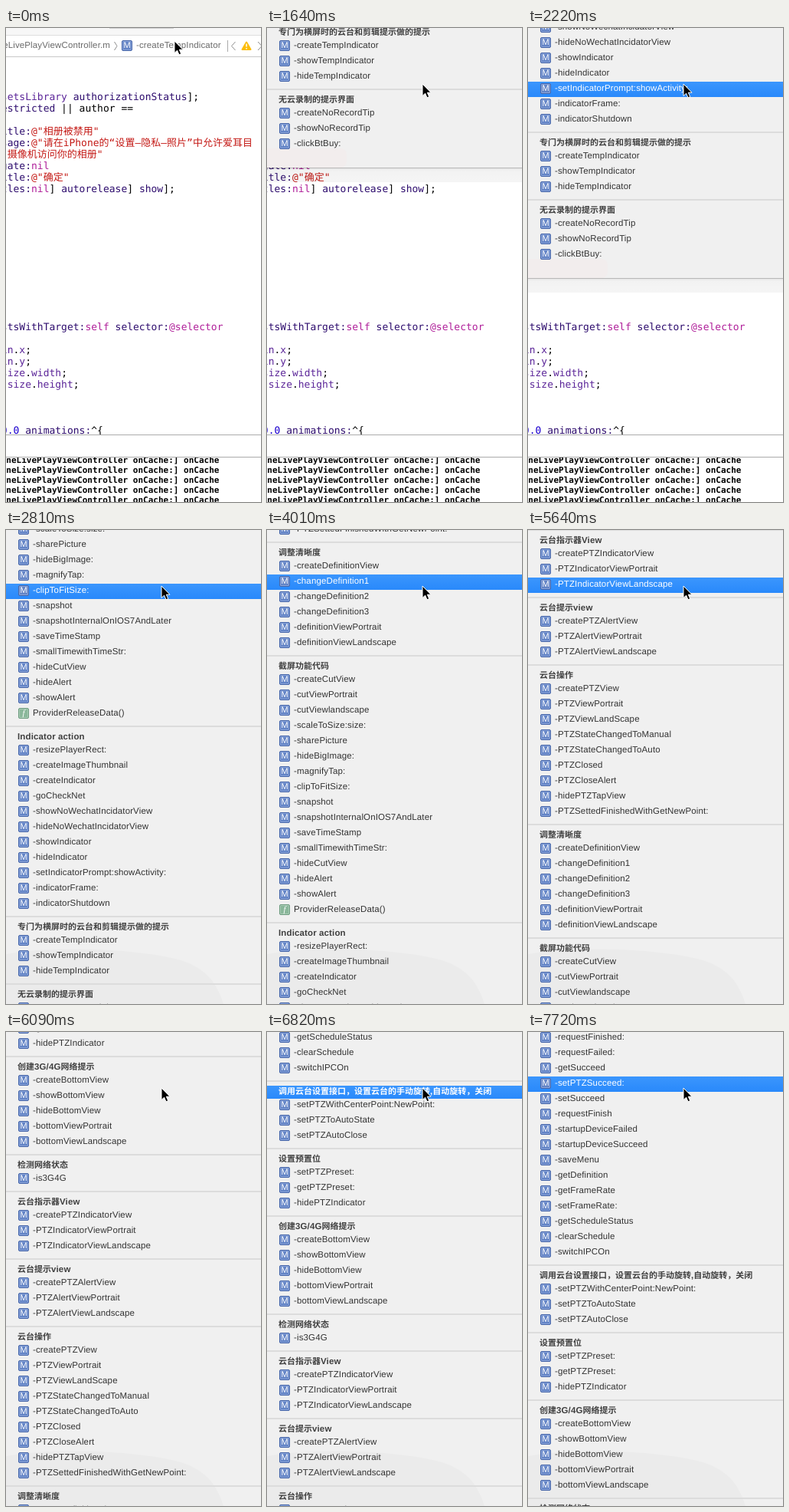
An HTML page that plays this animation: 333 px wide and 618 px high, repeating every 8000 ms.

```html
<!DOCTYPE html>
<html lang="zh">
<head>
<meta charset="utf-8">
<title>Jump bar menu</title>
<style>
html, body { margin: 0; width: 100%; height: 100%; overflow: hidden; background: #fff; }
#stage { position: absolute; left: 0; top: 0; width: 333px; height: 618px; overflow: hidden; background: #fff;
  text-rendering: geometricPrecision; --ui: "Liberation Sans", "Noto Sans CJK SC", "Noto Sans CJK", sans-serif; }
#stage * { box-sizing: border-box; }
#stage div, #stage svg, #stage i { position: absolute; white-space: pre; }
.ui { font: 11.5px/19px var(--ui); letter-spacing: .13px; color: #333; }
#tabs { left: 0; top: 0; width: 333px; height: 10px; background: #f7f7f7; border-bottom: 1px solid #dedede; }
#tabs div { left: 135px; top: 0; width: 84px; height: 1px; background: #cfcfcf; }
#bar { left: 0; top: 10px; width: 333px; height: 28px; border-bottom: 1px solid #c9c9c9; color: #6a6a6a; }
#bar svg { left: 0; top: 0; }
.code { font: 13px/15px "DejaVu Sans Mono", "Noto Sans CJK SC", "Noto Sans CJK", monospace; color: #000; }
.code b { font-weight: 400; }
.m { color: #2e0d6e; } .t { color: #5c2699; } .s { color: #c41a16; } .k { color: #b0209a; } .n { color: #1c00cf; }
#debug { left: 0; top: 530px; width: 333px; height: 30px; background: #fff; border: solid #ababab; border-width: 1px 0; }
#console { left: 0; top: 560px; width: 333px; height: 58px; overflow: hidden; background: #fff; }
#console div { left: .3px; font: bold 11px/13px "DejaVu Sans Mono", monospace; color: #000; }
#shade { left: 0; width: 333px; height: 19px; background: linear-gradient(rgba(0,0,0,.28) 1px, rgba(0,0,0,.1) 1px, rgba(0,0,0,.05) 4px, rgba(0,0,0,.04)); }
#menu { left: 0; top: 0; width: 333px; overflow: hidden; background: #f0f0f0; }
#list { left: 0; top: 0; width: 333px; }
#glow { left: 0; top: 157px; width: 104px; height: 25px; border-radius: 0 8px 8px 0; background: #f2eded; }
.row { left: 0; width: 333px; height: 20px; padding-left: 35px; }
.head { left: 0; width: 333px; height: 17px; line-height: 17px; padding-left: 15px; font-weight: 700; color: #404040; }
.head span { font-size: 11px; letter-spacing: 0; }
.sep { left: 0; width: 333px; height: 2px; background: #dcdcdc; }
.on { background: linear-gradient(#3b96fd, #2989fb); color: #fff; }
.icon { width: 14px; height: 14px; border: 1px solid #4464a8; border-radius: 2px; background: #6384c6; color: #fff;
  box-shadow: inset 0 0 0 1px #8ba5da; font: 11px/12px var(--ui); letter-spacing: 0; text-align: center; }
.row .icon { left: 16px; top: 2px; }
.fn { border-color: #6f9c80; background: #8ab79a; box-shadow: inset 0 0 0 1px #a9ccb5; }
.row .fn { font-style: italic; font-family: "Liberation Serif", serif; }
</style>
</head>
<body>
<div id="stage">
  <div id="tabs"><div></div></div>
  <div id="bar" class="ui">
    <div style="right:197px;top:4px">eLivePlayViewController.m</div>
    <i class="icon" style="left:151px;top:6px">M</i>
    <div style="left:170px;top:4px">-createTempIndicator</div>
    <svg width="333" height="27" fill="none" stroke="#8d8d8d">
      <path d="M141.500 8l3.500 5.500l-3.500 5.500M299.500 8l-5 5.500l5 5.500M329 8l5 5.500l-5 5.500"/>
      <path d="M289.500 6v15" stroke="#aaa"/>
      <path d="M314 8.500l5.500 9.500h-11z" fill="#fcbd0b" stroke="#fcbd0b" stroke-width="2" stroke-linejoin="round"/>
      <path d="M314 10.500v4M314 16v1.500" stroke="#fff" stroke-width="1.500"/>
    </svg>
  </div>
  <div id="code"></div>
  <div id="debug"></div>
  <div id="console"></div>
  <div id="shade"></div>
  <div id="menu">
    <svg width="333" height="618" style="left:0;top:0"><path d="M0 553C70 540 180 548 225 560C262 570 276 592 284 618H0Z" fill="#000" opacity=".018"/></svg>
    <div id="list"><div id="glow"></div></div>
  </div>
  <svg id="cursor" width="16" height="22" style="left:-1px;top:-1px">
    <path d="M1 1V16.500L4.600 13.200L7 18.800L9.700 17.600L7.300 12.200H12Z" fill="#000" stroke="#fff" stroke-linejoin="round"/>
  </svg>
</div>
<script>
const $ = id => document.getElementById(id);

function add(parent, cls, top, html) {
  const el = document.createElement('div');
  el.className = cls;
  el.style.top = top + 'px';
  el.innerHTML = html;
  parent.append(el);
  return el;
}

// Editor: [centre y, first column, text]; {x…} marks a colour class
const CHAR = 7.826;
const code = [
  [90, -1, '{tsetsLibrary} {mauthorizationStatus}];'],
  [105, -1, '{mestricted} || author =='],
  [135, -1, '{mitle:}{s@"相册被禁用"}'],
  [150, -1, '{msage:}{s@"请在iPhone的“设置–隐私–照片”中允许爱耳目}'],
  [165, 0, '{s摄像机访问你的相册"}'],
  [180, -1, '{mgate:}{knil}'],
  [195, -1, '{mitle:}{s@"确定"}'],
  [210, -1, '{mtles:}{knil}] {mautorelease}] {mshow}];'],
  [390, -1, '{mstsWithTarget:}{kself} {mselector:}{k@selector}'],
  [420, -1, '{tin}.{tx};'],
  [435, -1, '{tin}.{ty};'],
  [450, -1, '{tsize}.{twidth};'],
  [465, 0, '{tsize}.{theight};'],
  [525, -1, '{n0.0} {manimations:}^&#123;']
];
for (const [y, col, text] of code) {
  const html = text.replace(/\{(\w)([^}]*)\}/g, '<b class="$1">$2</b>');
  add($('code'), 'code', y - 7, html).style.left = 1.66 + col * CHAR + 'px';
}
for (const y of [-3, 10, 23, 36, 49]) {
  add($('console'), '', y, 'neLivePlayViewController onCache:] onCache');
}

// Menu: heading first, then its entries
const groups = [
  '|-requestFinished: -requestFailed: -getSucceed -setPTZSucceed: -setSucceed -requestFinish -startupDeviceFailed -startupDeviceSucceed -saveMenu -getDefinition -getFrameRate -setFrameRate: -getScheduleStatus -clearSchedule -switchIPCOn',
  '调用云台设置接口，设置云台的手动旋转,自动旋转，关闭|-setPTZWithCenterPoint:NewPoint: -setPTZToAutoState -setPTZAutoClose',
  '设置预置位|-setPTZPreset: -getPTZPreset: -hidePTZIndicator',
  '创建3G/4G网络提示|-createBottomView -showBottomView -hideBottomView -bottomViewPortrait -bottomViewLandscape',
  '检测网络状态|-is3G4G',
  '云台指示器View|-createPTZIndicatorView -PTZIndicatorViewPortrait -PTZIndicatorViewLandscape',
  '云台提示view|-createPTZAlertView -PTZAlertViewPortrait -PTZAlertViewLandscape',
  '云台操作|-createPTZView -PTZViewPortrait -PTZViewLandScape -PTZStateChangedToManual -PTZStateChangedToAuto -PTZClosed -PTZCloseAlert -hidePTZTapView -PTZSettedFinishedWithGetNewPoint:',
  '调整清晰度|-createDefinitionView -changeDefinition1 -changeDefinition2 -changeDefinition3 -definitionViewPortrait -definitionViewLandscape',
  '截屏功能代码|-createCutView -cutViewPortrait -cutViewlandscape -scaleToSize:size: -sharePicture -hideBigImage: -magnifyTap: -clipToFitSize: -snapshot -snapshotInternalOnIOS7AndLater -saveTimeStamp -smallTimewithTimeStr: -hideCutView -hideAlert -showAlert ProviderReleaseData()',
  'Indicator action|-resizePlayerRect: -createImageThumbnail -createIndicator -goCheckNet -showNoWechatIncidatorView -hideNoWechatIncidatorView -showIndicator -hideIndicator -setIndicatorPrompt:showActivity: -indicatorFrame: -indicatorShutdown',
  '专门为横屏时的云台和剪辑提示做的提示|-createTempIndicator -showTempIndicator -hideTempIndicator',
  '无云录制的提示界面|-createNoRecordTip -showNoRecordTip -clickBtBuy:'
];
const entries = [];
let y = -1785;
for (const group of groups) {
  const [title, names] = group.split('|');
  if (title) {
    add($('list'), 'sep', y - 4, '');
    const html = title.replace(/[\u3000-\u9fff\uff00-\uffef]+/g, '<span>$&</span>');
    entries.push({ el: add($('list'), 'ui head', y + 3, html), top: y + 3, end: y + 20 });
    y += 28;
  }
  for (const name of names.split(' ')) {
    const icon = name[0] === '-' ? '<i class="icon">M</i>' : '<i class="icon fn">f</i>';
    entries.push({ el: add($('list'), 'ui row', y - 9, icon + name), top: y - 9, end: y + 10 });
    y += 20;
  }
}

// Stepped tracks: [time, value…]
const LOOP = 8000, OPEN = 590, SHADE = 1640;
const scroll = [
  [0, 0], [1790, 32], [1940, 80], [2090, 144], [2230, 224], [2380, 304], [2530, 384], [2670, 464], [2810, 512],
  [3110, 560], [3260, 592], [3710, 640], [3860, 704], [4010, 768], [4150, 816], [4300, 848],
  [4600, 896], [4750, 960], [4900, 1024], [5050, 1072], [5200, 1088],
  [5640, 1136], [5790, 1216], [5940, 1296], [6090, 1344], [6530, 1408], [6680, 1488], [6820, 1552],
  [7420, 1616], [7570, 1712], [7720, 1792]
];
const pointer = [[0, 220, 17], [150, 219, 20], [290, 219, 22], [1190, 210, 50], [1340, 203, 73]];

const at = (track, t) => track.findLast(step => step[0] <= t);

function draw(t) {
  const [, offset] = at(scroll, t);
  const [, px, py] = at(pointer, t);
  const bottom = 182 + offset;
  $('menu').style.display = t < OPEN ? 'none' : 'block';
  $('menu').style.height = Math.min(618, bottom) + 'px';
  $('shade').style.display = t < SHADE ? 'none' : 'block';
  $('shade').style.top = bottom + 'px';
  $('list').style.transform = `translateY(${offset}px)`;
  $('cursor').style.transform = `translate(${px}px, ${py}px)`;
  const hit = py + .5 - offset;
  for (const e of entries) e.el.classList.toggle('on', hit >= e.top && hit < e.end);
}

const start = performance.now();
function tick() {
  draw((performance.now() - start) % LOOP);
  requestAnimationFrame(tick);
}
tick();
</script>
</body>
</html>
```
